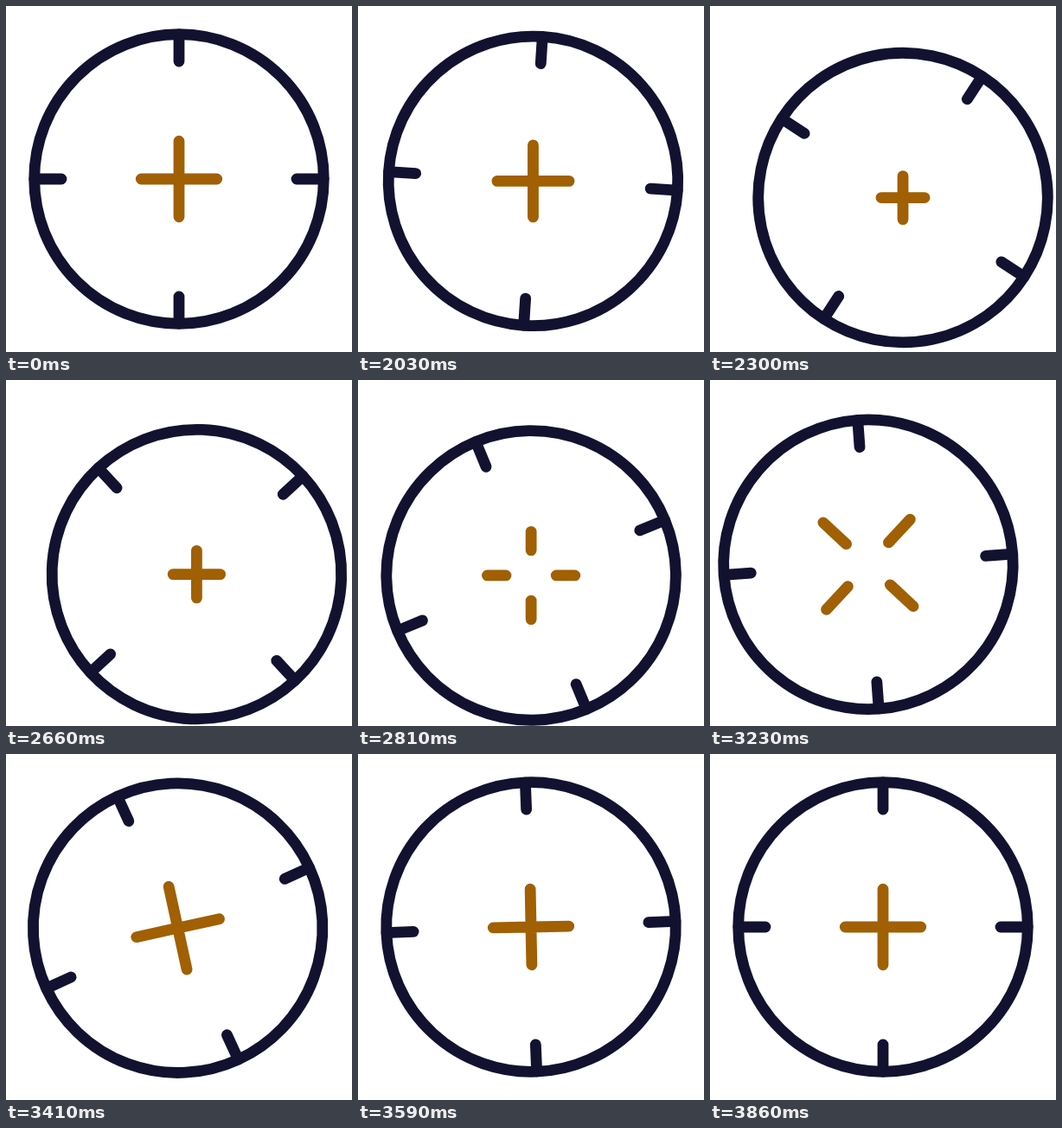
An HTML page for the animation above (3890 ms loop, 400 by 400 pixels).

```html
<!DOCTYPE html>
<html lang="en">
<head>
<meta charset="utf-8">
<title>Crosshair</title>
<style>
  html, body { margin: 0; width: 100%; height: 100%; overflow: hidden; background: #fff; }
  svg { display: block; width: 100%; height: 100%; }
  g { fill: none; stroke-width: 12.8; stroke-linecap: round; }
  #ring { stroke: #121230; }
  #cross { stroke: #a06003; }
</style>
</head>
<body>
<svg viewBox="0 0 400 400">
  <g id="ring">
    <circle r="167.3"/>
    <path d="M0-167V-136M167 0H136M0 167V136M-167 0H-136"/>
  </g>
  <g id="cross"><path/></g>
</svg>
<script>
const LOOP = 3890, REST = 2000, STEP = 30;

// Corners of the drift and the handles between them, relative to the centre.
const HOME = [0, 0], RIGHT = [22, 24.3], LEFT = [-24, 24.3];
const toRight = [HOME, [9, 9], [30, 24.5], RIGHT];
const toLeft = [RIGHT, [12, 26.5], [-11, 26.5], LEFT];
const toHome = [LEFT, [-25, 16], [-4, 4], HOME];

const easeOut = t => Math.sin(t * Math.PI / 2);
const easeInOut = t => (1 - Math.cos(t * Math.PI)) / 2;
const settle = t => 1 - (1 - t) ** 5 * (1 + 5 * t);

function bezier([a, b, c, d], p) {
  const u = 1 - p;
  return [0, 1].map(i =>
    a[i] * u ** 3 + 3 * b[i] * u * u * p + 3 * c[i] * u * p * p + d[i] * p ** 3);
}

const ring = document.getElementById('ring');
const cross = document.getElementById('cross');
const arms = cross.firstElementChild;

function draw(n) {
  const run = (from, to, ease) =>
    ease(Math.min(1, Math.max(0, (n - from) / (to - from))));

  const right = run(0, 19, easeOut);
  const left = run(20, 34, easeInOut);
  const home = run(34, 50, easeInOut);
  const spin = run(34, 61.5, settle);
  const [x, y] = home ? bezier(toHome, home)
    : left ? bezier(toLeft, left)
    : bezier(toRight, right);

  const place = (el, angle) =>
    el.setAttribute('transform', `translate(${200 + x} ${200 + y}) rotate(${angle})`);
  place(ring, 45 * (right + left) + 180 * spin);
  place(cross, 90 * spin);

  // The arms shorten, fly apart, then close again at full length.
  const gap = 53 * (run(18.5, 34.5, easeInOut) - run(34.5, 50.7, easeInOut));
  const shrink = run(0, 16, easeOut) - run(25, 51, easeInOut);
  const end = gap + 43.75 - 22.5 * shrink;
  arms.setAttribute('d',
    `M${gap} 0H${end}M${-gap} 0H${-end}M0 ${gap}V${end}M0 ${-gap}V${-end}`);
}

const start = performance.now();
function tick() {
  const t = (performance.now() - start) % LOOP;
  draw(Math.max(0, Math.floor((t - REST) / STEP)));
  requestAnimationFrame(tick);
}
tick();
</script>
</body>
</html>
```
